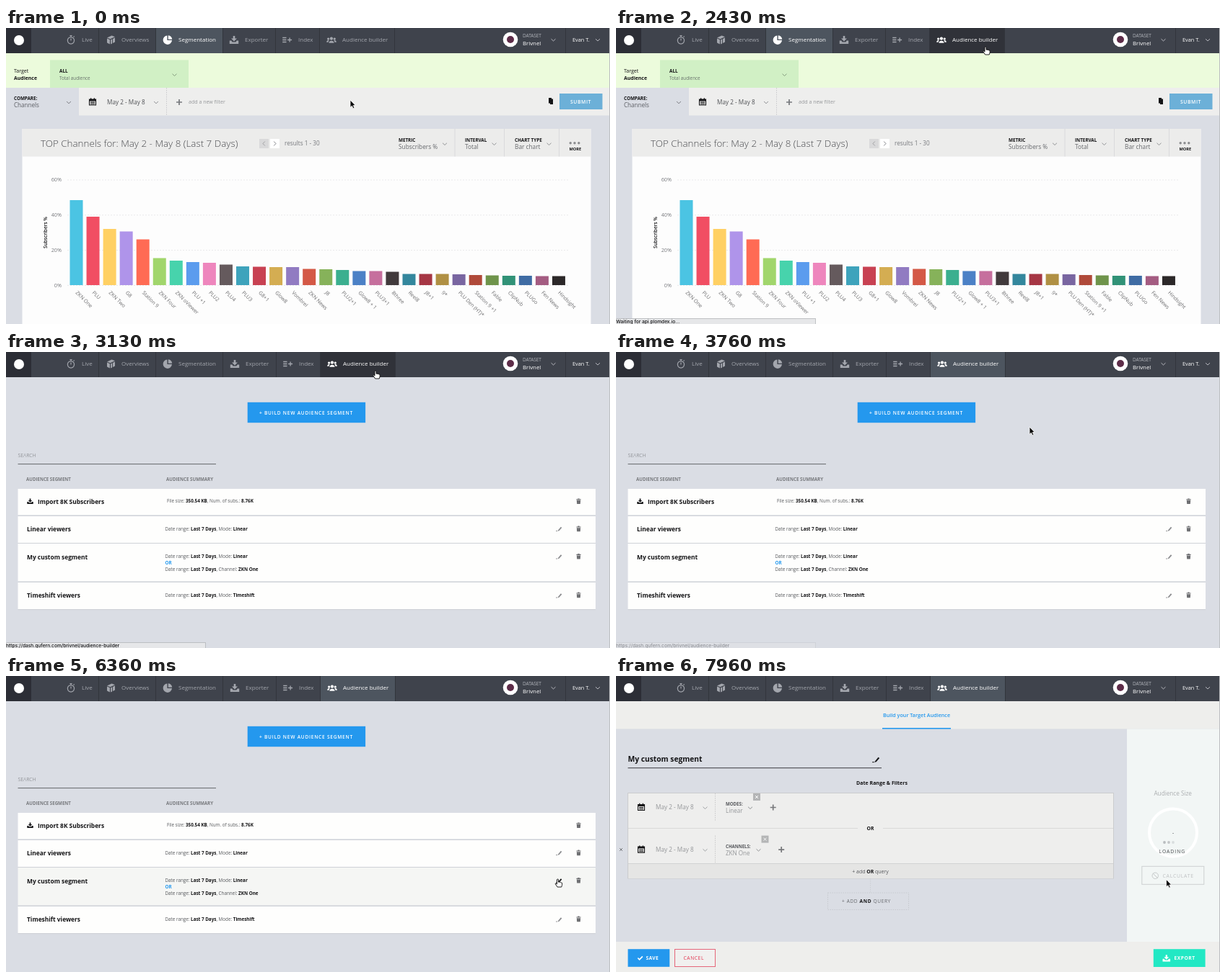
These frames come from a looping animation (837x411 px, 8 s). An HTML page:

```html
<!DOCTYPE html>
<html lang="en">
<head>
<meta charset="utf-8">
<title>Audience dashboard</title>
<style>
  html, body { margin: 0; width: 100%; height: 100%; overflow: hidden; background: #dadde4; }
  svg { display: block; width: 837px; height: 411px; font-family: "Open Sans", sans-serif; }
  #status text { font-family: Inter, Roboto, sans-serif; }
  .b { font-weight: 700; fill: #141416; }
</style>
</head>
<body>
<svg id="stage" viewBox="0 0 837 411" xmlns="http://www.w3.org/2000/svg"></svg>
<script>
const LOOP = 8000;
const BLUE = '#2498ee', PAGE = '#dadde4', PANEL = '#eeeeed', INK = '#141416', GREY = '#77797d';

// ---- markup helpers ----
const rect = (x, y, w, h, fill, more = '') =>
  `<rect x="${x}" y="${y}" width="${w}" height="${h}" fill="${fill}" ${more}/>`;
const text = (x, y, size, str, fill = INK, weight = 400, more = '') =>
  `<text x="${x}" y="${y}" font-size="${size}" fill="${fill}" font-weight="${weight}" ${more}>${str}</text>`;
const line = (x1, y1, x2, y2, stroke, more = '') =>
  `<path d="M${x1} ${y1}L${x2} ${y2}" stroke="${stroke}" fill="none" ${more}/>`;
const at = (x, y, inner, color = INK, turn = '', more = '') =>
  `<g transform="translate(${x} ${y}) ${turn}" color="${color}" ${more}>${inner}</g>`;
const group = (id, inner) => `<g id="${id}">${inner}</g>`;
const shape = d => `<path d="${d}" fill="currentColor"/>`;
const stroke = (d, w = 1) => `<path d="${d}" fill="none" stroke="currentColor" stroke-width="${w}"/>`;
const bold = s => `<tspan class="b">${s}</tspan>`;
const MID = 'text-anchor="middle"';
const DOTTED = 'stroke-dasharray="1.5 1.5"';
const spaced = n => `letter-spacing="${n}"`;

// ---- icons, centred on 0,0 ----
const icon = {
  chevron: stroke('M-3-1.3 0 1.5 3-1.3', .9),
  plus: stroke('M-4 0H4M0-4V4', 1.7),
  watch: stroke('M0-3.8A4.7 4.7 0 1 1-.1-3.8ZM-1.6-6H1.6M0-6V-4M3.6-4 4.6-5M0 1V-2', 1.2),
  cube: shape('M-5.5-3 1-6 5.5-4.2-1-1.3ZM-5.5-2-1.6-.2V6L-5.5 4ZM-.4-.2 1.6-1.1V5L-.4 6ZM2.5-1.5 5.5-3V3L2.5 4.5Z'),
  pie: shape('M-.6-6V.6H6A6.2 6.2 0 1 1-.6-6ZM.8-6.2A6.2 6.2 0 0 1 6.2-.8H.8Z'),
  load: shape('M-1.3-5.5H1.3V-2H4L0 2-4-2H-1.3ZM-6.2 1H-3.6L-2.4 3H2.4L3.6 1H6.2V5.4H-6.2Z'),
  list: stroke('M-6.3-3H-1M-6.3 0H-1M-6.3 3H-1M.6 0H6.6M3.6-3V3', 1.3),
  people: shape('M0-4A2.1 2.1 0 1 1-.1-4ZM-3.6 4.3C-3.6.2 3.6.2 3.6 4.3ZM-4.3-3A1.6 1.6 0 1 1-4.4-3ZM4.3-3A1.6 1.6 0 1 1 4.2-3ZM-6.8 3.3C-6.8.4-4.6 0-3.4.9-4 1.7-4.5 2.4-4.5 3.3ZM6.8 3.3C6.8.4 4.6 0 3.4.9 4 1.7 4.5 2.4 4.5 3.3Z'),
  calendar: stroke('M-4.5-3.5H4.5V4.5H-4.5Z', 1.1) + shape('M-4.5-3.5H4.5V-1H-4.5ZM-3-5.2H-1.7V-3H-3ZM1.7-5.2H3V-3H1.7Z') +
    stroke('M-3 .6H3M-3 2.7H3', 1.1),
  pencil: shape('M-1 2 2.9-2.8 4.3-1.6.5 2.7-1.6 3.2Z') + stroke('M-4 3H-2', .9),
  trash: shape('M-3.1-3H-1.2V-3.9H1.2V-3H3.1V-1.9H-3.1ZM-2.7-1.3H2.7L2.3 3.7H-2.3Z'),
  check: stroke('M-3.2 0-1 2.3 3.3-2.2', 1.7),
  copy: shape('M-3-4.5H1V3H-3ZM-1-3H3V4.5H-1Z'),
  cross: stroke('M-1.9-1.9 1.9 1.9M1.9-1.9-1.9 1.9', 1),
  off: stroke('M0-4.2A4.2 4.2 0 1 1-.1-4.2ZM-3.4-3.4 3.4 3.4', .9),
};

// ---- navigation ----
const navItems = [
  // left, right, icon x, text x, icon, label
  [36, 129, 90, 105, 'watch', 'Live'],
  [129, 208, 145.5, 160, 'cube', 'Overviews'],
  [208, 301, 224, 239, 'pie', 'Segmentation'],
  [301, 375, 317, 332, 'load', 'Exporter'],
  [375, 436, 390.5, 406, 'list', 'Index'],
  [436, 540, 452, 467, 'people', 'Audience builder'],
];
function navMarkup() {
  const items = navItems.map(([l, r, ix, tx, ic, label], i) =>
    `<g id="nav${i}">` + rect(l, 0, r - l, 35, 'none') + line(r - .5, 0, r - .5, 35, '#32353c') +
    at(ix, 16.5, icon[ic], 'inherit') + text(tx, 19, 8, label, 'currentColor') + '</g>').join('');
  return rect(0, 0, 836, 35, '#3f434c') + rect(0, 0, 35, 35, '#2c2e36') +
    '<circle cx="18" cy="17" r="7" fill="#fff"/>' + items +
    '<circle cx="699" cy="16" r="10.3" fill="#fff"/><circle cx="699" cy="16" r="5" fill="#5d2c48"/>' +
    text(716, 12.6, 6.4, 'DATASET', '#b4b7be') + text(716, 23.6, 7.8, 'Brivnel', '#fff') +
    at(758.5, 16.5, icon.chevron, '#c4c6cb') + line(775.5, 0, 775.5, 35, '#32353c') +
    text(785, 19, 7.3, 'Evan T.', '#fff') + at(820, 16.5, icon.chevron, '#c4c6cb');
}

// ---- chart page ----
const names = ('ZKN One,PLU,ZKN Two,G8,Station 9,ZKN Four,ZKN oViewer,PLU +1,PLU2,PLU4,PLU3,G8+1,Glow8,Vombrel,' +
  'ZKN News,J8,PLU2+1,Glow8 + 1,PLU3+1,8three,Reel8,J8+1,9*,PLU Den (HT)*,Station 9 +1,Fable,ClipNub,PLUGo,' +
  'Fen News,Hindsight').split(',');
const heights = [118, 95, 78, 74.5, 63.5, 37.5, 34, 32, 31, 28.5, 26, 25.5, 25, 25, 22.5, 22, 21, 19.5,
  19.5, 18.5, 15.5, 15.5, 15.5, 15, 14, 13.5, 13, 13, 12.5, 12.5];
const hues = [[75, 196, 227], [241, 78, 99], [255, 208, 99], [175, 148, 234], [255, 107, 84],
  [161, 214, 108], [71, 211, 172], [91, 156, 238], [238, 134, 189], [101, 90, 93]];
const shades = [1, .83, .69];

function barMarkup(name, i) {
  const x = 88.5 + i * 23.05, h = heights[i], k = i === 19 ? .64 : i === 29 ? .44 : shades[i / 10 | 0];
  const fill = `rgb(${hues[i % 10].map(v => Math.round(v * k))})`;
  return rect(x.toFixed(2), 357 - h, 18, h, fill) +
    text(0, 0, 7.1, name, '#6a6a6c', 400, `transform="translate(${(x + 7.5).toFixed(2)} 368) rotate(45)"`);
}
const pick = (x, label, value, chev) => text(x, 157.6, 6.3, label, INK, 700) +
  text(x, 168, 8.3, value, '#66686c') + at(chev, 161, icon.chevron, '#88898d');

function chartPage() {
  const grid = [60, 40, 20, 0].map((v, i) => {
    const y = 211 + i * 48.8;
    return line(85, y, 779, y, '#e4e4e6', 'stroke-width=".8" stroke-dasharray="2 2"') +
      text(77, y + 2.4, 7.3, v + '%', GREY, 400, 'text-anchor="end"');
  }).join('');
  return rect(0, 35, 836, 48, '#ecfbdc') + rect(61, 44.5, 192, 38.5, '#d1f0c5') +
    text(11, 62, 7, 'Target') + text(11, 72, 6.9, 'Audience', INK, 700) +
    text(74, 62, 6.4, 'ALL', INK, 700) + text(74, 71.6, 6.3, 'Total audience', '#66706a') +
    at(233.5, 65, icon.chevron, '#7d9378') +
    rect(101, 83, 735, 38.5, PANEL) +
    text(11, 100, 6.3, 'COMPARE:', INK, 700) + text(11, 110.4, 8.1, 'Channels', '#5c5e64') +
    at(87, 103.3, icon.chevron, GREY) + at(120, 102.5, icon.calendar) +
    text(140, 105.6, 8.2, 'May 2 - May 8', '#505256') + at(208, 103.3, icon.chevron, '#88898d') +
    line(222.5, 83, 222.5, 121, '#c9c9cb', DOTTED) +
    at(240, 103, icon.plus, GREY) + text(253, 105.3, 7.05, 'add a new filter', '#96989b') +
    at(755, 101.5, icon.copy) + rect(767, 91, 59.5, 22, '#6cb0d8') +
    text(782, 104.6, 6.8, 'SUBMIT', '#fff', 600, spaced(.6)) +
    rect(22.5, 140, 788, 271, '#fdfdfd') + rect(22.5, 140, 788, 38.5, '#ececeb') +
    [622, 690.5, 766.5].map(x => line(x, 140, x, 178.5, '#dadadc')).join('') +
    text(48, 165, 13.4, 'TOP Channels for: May 2 - May 8 (Last 7 Days)', '#4a4b4f', 300) +
    rect(351, 154, 13, 13, '#d9d9da') + rect(366, 154, 13, 13, '#fff') +
    at(357.5, 160.5, icon.chevron, '#9b9b9d', 'rotate(90)') +
    at(372.5, 160.5, icon.chevron, GREY, 'rotate(-90)') +
    text(386, 163.4, 8.2, 'results 1 - 30', GREY) +
    pick(544, 'METRIC', 'Subscribers %', 608) + pick(636, 'INTERVAL', 'Total', 676.5) +
    pick(705, 'CHART TYPE', 'Bar chart', 752.5) +
    [782.2, 788, 793.8].map(x => `<circle cx="${x}" cy="159.7" r="1.7" fill="#8a8b8e"/>`).join('') +
    text(788.8, 170, 5.6, 'MORE', INK, 700, MID) + grid +
    text(0, 0, 6.5, 'Subscribers %', INK, 600, MID + ' transform="translate(56.5 284) rotate(-90)"') +
    names.map(barMarkup).join('');
}

// ---- segment list page ----
const rows = [[190, 36.5], [228, 37], [266, 52.5], [320, 37]];
const range = tail => `Date range: ${bold('Last 7 Days')}, ${tail}`;
const summary = (x, y, str) => text(x, y, 6.3, str, '#55575b');

function listPage() {
  const title = (x, y, s) => text(x, y, 8.4, s, INK, 700);
  const full = rows.map(([y, h], i) => rect(16.5, y, 800.5, h, '#fefefd', `id="row${i}"`) +
      line(16.5, y + h + .7, 817, y + h + .7, '#cdd0d5')).join('') +
    at(33.5, 207.3, icon.load, INK, 'scale(.68)') +
    title(44, 211, 'Import 8K Subscribers') + title(29, 249.3, 'Linear viewers') +
    title(29, 287.7, 'My custom segment') + title(29, 341.3, 'Timeshift viewers') +
    summary(223, 209.3, `File size: ${bold('350.54 KB')}, Num. of subs.: ${bold('8.76K')}`) +
    summary(220.5, 247.5, range('Mode: ' + bold('Linear'))) +
    summary(220.5, 285.8, range('Mode: ' + bold('Linear'))) +
    text(220.5, 294.6, 6.3, 'OR', BLUE, 700) +
    summary(220.5, 303.6, range('Channel: ' + bold('ZKN One'))) +
    summary(220.5, 339.6, range('Mode: ' + bold('Timeshift'))) +
    [245.5, 284, 338].map((y, i) => at(766, y, icon.pencil, '#8b8c8f', '', `id="pen${i}"`)).join('') +
    [207.3, 245.5, 283.8, 337.5].map(y => at(793.5, y, icon.trash, '#6e6f72')).join('');
  return rect(334.7, 69.8, 163.4, 28.4, BLUE) +
    text(351, 86.6, 6.6, '+ BUILD NEW AUDIENCE SEGMENT', '#fff', 600, spaced(.75)) +
    text(16.5, 146.2, 6.9, 'SEARCH', '#6c6e72', 300) + line(16.5, 155.6, 291, 155.6, '#66686c') +
    text(28, 178.5, 6.15, 'AUDIENCE SEGMENT', GREY, 700) +
    text(222, 178.5, 6.2, 'AUDIENCE SUMMARY', GREY, 700) +
    group('empty', rect(16.5, 189.7, 800.5, 36.8, '#fefefd') +
      text(416.5, 211, 8, 'No audience segments to display.', INK, 400, MID)) +
    group('full', full);
}

// ---- builder page ----
function query(y, label, value, end) {
  return at(35, y, icon.calendar) + text(55, y + 3.3, 8.2, 'May 2 - May 8', '#95979a') +
    at(123.5, y + 1, icon.chevron, '#95979a') +
    line(137.5, y - 19, 137.5, y + 19, '#c9c9ca', DOTTED) +
    text(152, y - 2, 6.1, label, '#55575b', 700) + text(152, y + 8, 8.1, value, '#95979a') +
    at(end, y + 1, icon.chevron, '#85878a') +
    rect(end + 4, y - 19, 10, 10, '#b4b5b6') + at(end + 9, y - 14, icon.cross, '#fff') +
    at(end + 31.7, y + .5, icon.plus, '#77787b');
}
function builderPage() {
  return rect(0, 35, 836, 38.5, '#eeeeec') + rect(708, 73.5, 128, 296, '#f2f6f5') +
    rect(0, 369, 836, 42, '#eeeeec') +
    group('tab', text(416.5, 57.2, 7.2, 'Build your Target Audience', BLUE, 600, MID)) +
    rect(369, 72, 95, 1.6, BLUE) +
    text(16.5, 118.6, 10.25, 'My custom segment', INK, 700) + line(16.5, 127.7, 368, 127.7, '#3a3b3f') +
    at(360, 116, icon.pencil, INK, 'scale(1.2)') +
    text(368.5, 151.2, 7, 'Date Range &amp; Filters', INK, 700, MID) +
    rect(16.5, 162.5, 673, 118.5, PANEL, 'stroke="#cbccce"') + rect(17, 260.5, 672, 20.5, '#e5e5e4') +
    line(17, 260.5, 689, 260.5, '#d1d2d3') +
    query(182, 'MODES:', 'Linear', 186) + query(240.6, 'CHANNELS:', 'ZKN One', 197.5) +
    line(17, 211.5, 335, 211.5, '#d9d9d9') + line(370, 211.5, 689, 211.5, '#d9d9d9') +
    text(352.5, 213.7, 6.8, 'OR', INK, 700, MID) + at(7, 241, icon.cross, GREY) +
    text(352.5, 273.5, 6.9, `+ add ${bold('OR')} query`, '#55575b', 400, MID) +
    line(352.5, 281, 352.5, 301, '#cccfd5', DOTTED) +
    rect(293.5, 301, 112, 23.5, 'none', 'stroke="#c6c9cf" ' + DOTTED) +
    text(313, 315.2, 6.6, `+ ADD ${bold('AND')} QUERY`, '#66686c', 400, spaced(.6)) +
    text(771.7, 166.3, 8.2, 'Audience Size', '#abaeb0', 400, MID) +
    '<circle cx="772" cy="217.5" r="33" fill="none" stroke="#fff" stroke-width="4"/>' +
    text(772, 220, 8, '-', '#55575b', 400, MID) +
    [760, 766, 772].map((x, i) => `<circle id="dot${i}" cx="${x}" cy="231" r="1.9" fill="#b5b9bc"/>`).join('') +
    text(752.5, 245.6, 6.8, 'LOADING', '#4d4f53', 400, spaced(1)) +
    rect(728.8, 264.3, 86, 25, 'none', 'stroke="#cdd0d1"') +
    at(747.3, 277.3, icon.off, '#bfc2c3') +
    text(757.5, 279.7, 6.9, 'CALCULATE', '#bfc2c3', 400, spaced(.75)) +
    rect(16.5, 379.2, 57.8, 24.6, BLUE) + at(33.5, 391.5, icon.check, '#fff') +
    text(41.5, 394.2, 6.7, 'SAVE', '#fff', 700, spaced(.4)) +
    rect(81.5, 379.5, 56, 24, '#f1f0ef', 'stroke="#e5667a"') +
    text(93.5, 394.2, 6.7, 'CANCEL', '#e2344f', 400, spaced(.6)) +
    rect(744.8, 379.2, 71.8, 24.8, '#22e8c4') +
    at(762.8, 392, icon.load, '#fff', 'scale(.85)') +
    text(773.5, 394.4, 6.7, 'EXPORT', '#fff', 700, spaced(.5));
}

// ---- assemble ----
const ARROW = 'M0 0V10.3L2.4 8.2 4 11.7 5.8 10.9 4.3 7.5H7.2Z';
const HAND = 'M-1 1Q-1 0 0 0T1 1V4.2Q2 3.6 3 4.4 4 4 4.8 4.9 6.3 4.8 6.2 6.2 6.3 8.5 5.2 11H-.4Q-1.6 9-3.2 7-3.6 5.8-2.4 5.8L-1 7Z';
document.getElementById('stage').innerHTML =
  rect(0, 0, 837, 411, PAGE) + group('page0', chartPage()) + group('page1', listPage()) +
  group('page2', builderPage()) + group('nav', navMarkup()) +
  group('status', rect(-1, 403.5, 277.5, 9, '#e6e7e9', 'stroke="#b4b6ba" stroke-width=".8"') +
    text(0, 410.4, 6.6, '', '#101012', 500, 'id="url"')) +
  rect(836, 0, 1, 411, '#bcbec1') +
  `<path id="arrow" d="${ARROW}" fill="#0a0a0a" stroke="#fff" stroke-width=".8"/>` +
  `<path id="hand" d="${HAND}" fill="#fff" stroke="#0a0a0a" stroke-width=".9" stroke-linejoin="round"/>`;

// ---- motion ----
const path = [ // time, x, y
  [0, 477, 100], [530, 477, 100], [900, 512, 26.5], [2129, 512, 26.5], [2130, 512, 26], [3370, 512, 26],
  [3500, 573, 104], [3770, 573, 104], [4030, 570, 141], [4370, 570, 141], [4500, 688, 207],
  [4770, 688, 207], [4900, 746, 254], [5170, 746, 254], [5360, 761, 296], [5570, 761, 296],
  [5820, 774, 291], [6080, 768, 285], [6360, 764.5, 282], [7299, 764.5, 282], [7300, 763.5, 282],
  [7800, 763.5, 282], [7960, 762.5, 282.5], [LOOP, 762.5, 282.5],
];
const $ = id => document.getElementById(id);
const clamp = v => Math.max(0, Math.min(1, v));
const ramp = (t, a, b) => clamp((t - a) / (b - a));
const show = (id, on) => $(id).setAttribute('visibility', on ? 'inherit' : 'hidden');

function cursorAt(t) {
  const i = path.findIndex(p => p[0] > t);
  const [t0, x0, y0] = path[i - 1], [t1, x1, y1] = path[i];
  const p = ramp(t, t0, t1), e = p * p * (3 - 2 * p);
  return [x0 + (x1 - x0) * e, y0 + (y1 - y0) * e];
}

function render(t) {
  const page = t < 2500 ? 0 : t < 7130 ? 1 : 2;
  for (let i = 0; i < 3; i++) show('page' + i, i === page);

  const hover = t >= 800 && t < 3400;
  navItems.forEach((_, i) => {
    const active = page === 0 ? i === 2 : i === 5 && !hover;
    const hot = i === 5 && hover;
    const el = $('nav' + i);
    el.firstChild.setAttribute('fill', hot ? '#303239' : active ? '#4d555f' : 'none');
    el.setAttribute('color', hot || active ? '#fff' : '#a3a6ad');
    el.setAttribute('transform', `translate(${page === 0 && i > 2 ? -1 : 0} 0)`);
  });

  $('url').textContent = t >= 2430 && t < 2500 ? 'Waiting for api.plomdex.io...'
    : 'https://dash.qufern.com/brivnel/audience-builder';
  $('status').setAttribute('opacity', t < 800 ? 0 : 1 - ramp(t, 3700, 3795));

  const loaded = t >= 3130;
  show('empty', !loaded && page === 1);
  show('full', loaded && page === 1);

  const [x, y] = cursorAt(t);
  rows.forEach(([top, h], i) =>
    $('row' + i).setAttribute('fill', t > 4000 && y >= top && y < top + h + 1 ? '#f5f6f4' : '#fefefd'));
  const editing = t >= 5980 && t < 7130;
  $('pen1').setAttribute('color', editing ? INK : '#8b8c8f');

  $('tab').setAttribute('opacity', .65 + .35 * ramp(t, 7270, 7400));
  for (let i = 0; i < 3; i++)
    $('dot' + i).setAttribute('opacity', [.95, .8, .4][i] * (.4 + .6 * ramp(t, 7800 + i * 20, 7920 + i * 20)));

  const pointing = hover || t >= 5980 && t < 7300;
  for (const id of ['arrow', 'hand'])
    $(id).setAttribute('transform', `translate(${x.toFixed(2)} ${y.toFixed(2)})`);
  show('hand', pointing);
  show('arrow', !pointing);
}

function tick() {
  render(performance.now() % LOOP);
  requestAnimationFrame(tick);
}
tick();
</script>
</body>
</html>
```
